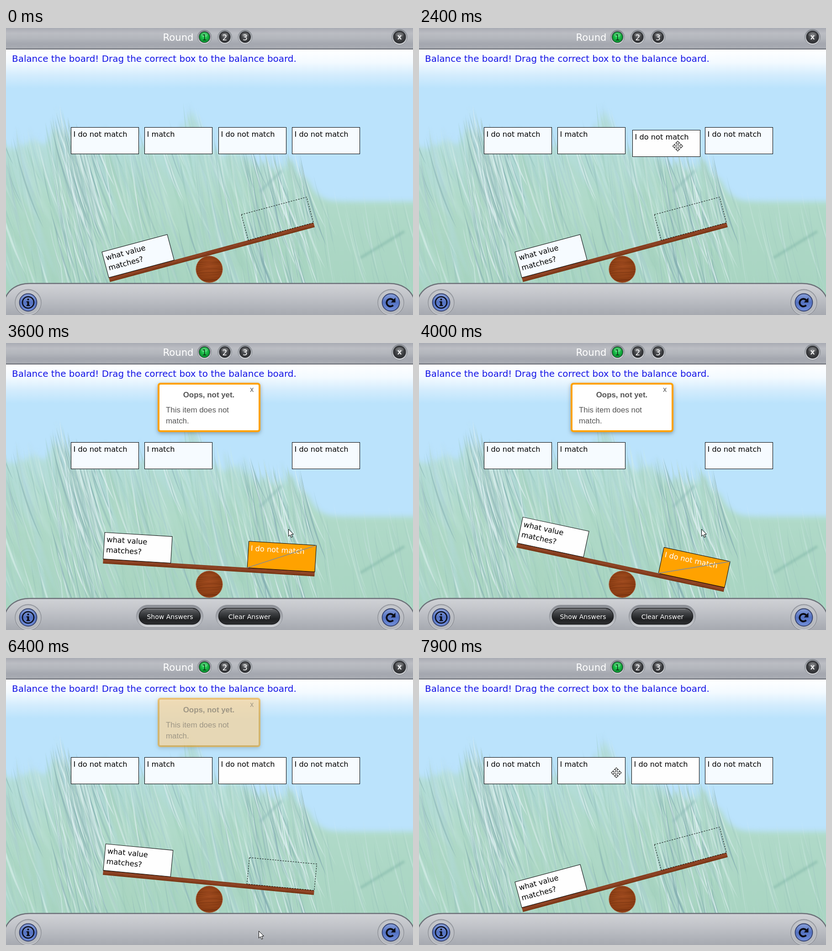
These frames come from a looping animation (891x628 px, 8000 ms). An HTML page with a canvas:

```html
<!DOCTYPE html>
<html lang="en">
<head>
<meta charset="utf-8">
<title>Balance the board</title>
<style>
html, body { margin: 0; width: 100%; height: 100%; overflow: hidden; }
canvas { display: block; }
</style>
</head>
<body>
<canvas id="stage" width="891" height="628"></canvas>
<script>
const W = 891, H = 628, LOOP = 8000;
const SANS = '"DejaVu Sans", sans-serif';
const ARIAL = '"Liberation Sans", sans-serif';
const PIVOT = { x: 445.25, y: 471.6 };
const BOX_W = 148, BOX_H = 58, BOX_Y = 217.5;
const PALE = '#f6fbff', WHITE = '#fefefe', ORANGE = '#ffa200';
const GRAB = 2300, DROP = 3200, PRESS = 6100, CLEAR = 6300;
const slotX = i => Math.floor(142 + 161.5 * i) + 0.5;

const stage = document.getElementById('stage').getContext('2d');
let c = stage;

function makeRandom(seed) {
  return () => (seed = (seed * 16807) % 2147483647) / 2147483647;
}

function addStops(gradient, colors) {
  colors.forEach((color, i) => gradient.addColorStop(i / (colors.length - 1), color));
  return gradient;
}

const vertical = (y0, y1, ...colors) => addStops(c.createLinearGradient(0, y0, 0, y1), colors);
const radial = (x, y, r, ...colors) =>
  addStops(c.createRadialGradient(x, y - r * 0.35, 0, x, y, r), colors);

function paint(fill, stroke, width = 1) {
  if (fill) { c.fillStyle = fill; c.fill(); }
  if (stroke) { c.strokeStyle = stroke; c.lineWidth = width; c.stroke(); }
}

function rect(x, y, w, h, fill) {
  c.fillStyle = fill;
  c.fillRect(x, y, w, h);
}

function disc(x, y, r, fill, stroke, width) {
  c.beginPath();
  c.arc(x, y, r, 0, Math.PI * 2);
  paint(fill, stroke, width);
}

function pill(x, y, w, h, r, fill, stroke, width) {
  c.beginPath();
  c.roundRect(x, y, w, h, r);
  paint(fill, stroke, width);
}

function line(x0, y0, x1, y1, color, width) {
  c.beginPath();
  c.moveTo(x0, y0);
  c.lineTo(x1, y1);
  paint(null, color, width);
}

function poly(points, fill, stroke, width) {
  c.beginPath();
  points.forEach(([x, y]) => c.lineTo(x, y));
  c.closePath();
  paint(fill, stroke, width);
}

function text(str, x, y, size, color, { font = SANS, weight = '', align = 'left' } = {}) {
  c.font = `${weight} ${size}px ${font}`;
  c.textAlign = align;
  c.fillStyle = color;
  c.fillText(str, x, y);
}

// ---- Field of grain ----

const bump = (x, center, width) => Math.exp(-(((x - center) / width) ** 2));

// Height of the grain tops: high on the left, falling to a flat horizon on the right.
function ridge(x) {
  const fall = 1 / (1 + Math.exp((655 - x) / 14));
  const left = 235 + 45 * bump(x, 580, 90) - 45 * bump(x, 112, 22) - 65 * bump(x, 405, 30);
  return left + (372 - left) * fall;
}

function blades(random, { count, from, to, width, alpha, tones }) {
  for (let i = 0; i < count; i++) {
    const x = from + random() * (to - from);
    const depth = random();
    const top = ridge(x) - 30 + 330 * depth * depth + random() * 25;
    const len = 70 + random() * 150;
    const lean = len * (0.1 + random() * 0.28);
    const w = width * (0.4 + random());
    c.beginPath();
    c.moveTo(x, top);
    c.quadraticCurveTo(x + lean * 0.35 + w, top + len * 0.5, x + lean + w, top + len);
    c.quadraticCurveTo(x + lean * 0.35 - w, top + len * 0.6, x, top);
    paint(`rgba(${tones[i % tones.length]},${alpha * (0.5 + random())})`);
  }
}

function drawField() {
  rect(0, 0, W, H, vertical(47, 132, '#ffffff', '#f3faff', '#d3ecfd', '#bbe3fc'));
  const random = makeRandom(4711);
  const crest = [];
  for (let x = -20; x <= W + 20; x += 10) crest.push([x, ridge(x) + 8 + 26 * random() * (x < 660)]);
  crest.push([W + 20, H], [-20, H]);
  c.save();
  c.filter = 'blur(6px)';
  poly(crest, vertical(190, 560, '#b8e0e6', '#b4ddd8', '#b0dac9', '#acd7c5', '#a9d5c2'));
  c.filter = 'blur(3px)';
  blades(random, { count: 170, from: -40, to: 640, width: 9, alpha: 0.24,
    tones: ['158,205,184', '196,229,222', '172,214,190', '184,220,232'] });
  c.filter = 'none';
  blades(random, { count: 330, from: -40, to: 645, width: 2.6, alpha: 0.24,
    tones: ['150,199,182', '205,234,226', '168,212,190', '160,196,206'] });
  const bristle = { width: 0.8, alpha: 0.55, tones: ['222,240,242', '136,178,180', '176,212,204'] };
  blades(random, { ...bristle, count: 190, from: 95, to: 190 });
  blades(random, { ...bristle, count: 150, from: 515, to: 650 });
  blades(random, { ...bristle, count: 120, from: -30, to: 520, alpha: 0.4 });
  blades(random, { ...bristle, count: 70, from: 660, to: W, alpha: 0.2 });
  c.filter = 'blur(2px)';
  line(776, 503, 872, 445, 'rgba(122,178,164,.45)', 6);
  line(556, 358, 604, 312, 'rgba(130,180,178,.4)', 6);
  c.restore();
}

// ---- Fixed controls ----

function roundButton(x, y, r, colors) {
  disc(x, y, r + 4, vertical(y - r - 4, y + r + 4, '#868a91', '#d7d9dd'), '#7c8087', 0.8);
  disc(x, y, r + 1, '#303236');
  disc(x, y, r, radial(x, y, r, ...colors));
  c.beginPath();
  c.ellipse(x, y - r * 0.45, r * 0.7, r * 0.42, 0, 0, Math.PI * 2);
  paint('rgba(255,255,255,.18)');
}

function drawHeader() {
  rect(0, 0, W, 46, vertical(0, 46, '#a9acb4', '#bbbdc3', '#b3b6bc', '#a4a7af', '#a9acb3'));
  rect(0, 45, W, 2, '#666a72');
  text('Round', 343.5, 28, 21.2, '#fff');
  const dark = ['#77797d', '#4b4d50', '#2d2e31'];
  const green = ['#4cf07a', '#1fc24c', '#078a2c'];
  for (let i = 0; i < 3; i++) {
    const x = 434.5 + i * 44.5;
    roundButton(x, 20, 11.5, i ? dark : green);
    text(i + 1, x, 26.5, 17, i ? '#fff' : '#062d10', { align: 'center' });
  }
  roundButton(861.5, 20, 13, dark);
  text('X', 861.5, 24.5, 12.5, '#fff', { align: 'center', weight: 'bold' });
  text('Balance the board! Drag the correct box to the balance board.', 13, 74, 19.93, '#1414e6');
}

function blueButton(x, y) {
  disc(x, y, 28.5, vertical(y - 29, y + 29, '#a6a9b0', '#d0d2d6'), '#85888f', 1.2);
  disc(x, y, 26.5, vertical(y - 27, y + 27, '#c6c8cd', '#b0b3b9'));
  disc(x, y, 19, vertical(y - 20, y + 20, '#8ca3dc', '#5472c2', '#7390dc'), '#34406b', 1.8);
}

function drawFooter() {
  const curve = 52;
  c.beginPath();
  c.moveTo(-2, 592);
  c.bezierCurveTo(6, 572, 24, 559, curve, 559);
  c.lineTo(W - curve, 559);
  c.bezierCurveTo(W - 24, 559, W - 6, 572, W + 2, 592);
  c.lineTo(W + 2, H + 5);
  c.lineTo(-2, H + 5);
  c.closePath();
  paint(vertical(559, 628, '#d0d2d6', '#c4c6cb', '#b5b8be', '#a6a9b0'), '#6d7179', 2.4);

  const ink = '#0b0d18', y = 600.5;
  blueButton(48.5, y);
  disc(48.5, y, 12.5, null, ink, 2.6);
  disc(48.5, y - 6.5, 2.1, ink);
  rect(46.5, y - 2.5, 4, 10, ink);
  rect(44.8, y - 2.5, 4, 2.2, ink);
  rect(44.8, y + 5.5, 7.6, 2.4, ink);

  blueButton(842.5, y);
  c.beginPath();
  c.arc(841.5, y + 0.5, 8.3, 0.75, Math.PI * 1.78);
  paint(null, ink, 4);
  poly([[852.5, y - 10.5], [852.5, y], [842.5, y]], ink);
}

function footerButton(x, label, pressed) {
  pill(x, 573.5, 146, 49, 24.5, vertical(573, 623, '#8a8d94', '#a6a9af', '#d2d4d8'), '#8d9097', 1);
  const shades = pressed ? ['#2a2b2d', '#1b1c1e', '#3a3b3e'] : ['#6b6c70', '#3e4043', '#202123', '#2e2f32'];
  pill(x + 6, 580.5, 134, 35, 17.5, vertical(580, 616, ...shades), '#17181a', 1.4);
  line(x + 22, 582.2, x + 124, 582.2, 'rgba(255,255,255,.35)', 1);
  text(label, x + 73.5, 604, 14, '#fff', { align: 'center' });
}

function drawWheel() {
  const x = 445, y = 528, r = 29.3;
  disc(x, y, r, radial(x, y, 34, '#a24c20', '#964519', '#873a12'));
  c.save();
  c.clip();
  for (let i = 0; i < 15; i++) {
    const gy = y - r + i * 4;
    c.beginPath();
    c.moveTo(x - r, gy + 3);
    c.bezierCurveTo(x - 12, gy - 4 * Math.sin(i), x + 8, gy + 5 * Math.cos(i * 2), x + r, gy - 2);
    paint(null, `rgba(84,30,6,${0.25 + 0.15 * Math.sin(i * 5)})`, 1.2);
  }
  c.restore();
  disc(x, y, r, null, '#b98263', 0.9);
}

// ---- Moving parts ----

function card(x, y, lines, fill, ink = '#000') {
  rect(x, y, BOX_W, BOX_H, fill);
  c.strokeStyle = '#000';
  c.lineWidth = 1;
  c.strokeRect(x, y, BOX_W, BOX_H);
  lines.forEach((str, i) => text(str, x + 5, y + 20.5 + i * 22.6, 16.2, ink));
}

function drawBoard(angle, placed, fill) {
  const half = 232, top = 15, right = half - BOX_W, boxTop = top - BOX_H;
  c.save();
  c.translate(PIVOT.x, PIVOT.y);
  c.rotate(angle * Math.PI / 180);
  rect(-half, top, half * 2, 10, vertical(top, top + 10, '#7f3a18', '#94482a', '#8a4020', '#74330f'));
  for (let i = 0; i < 24; i++) {
    rect(-half + (i * 97) % 430, top + 2 + (i * 5) % 7, 32, 0.9, 'rgba(80,30,8,.3)');
  }
  card(-half, boxTop, ['what value', 'matches?'], fill);
  if (placed) {
    card(right, boxTop, ['I do not match'], ORANGE, '#fff');
    line(right, top, half, boxTop, '#8c8c8c', 1.6);
  } else {
    c.setLineDash([3, 2.6]);
    c.strokeStyle = '#000';
    c.lineWidth = 1;
    c.strokeRect(right, boxTop, BOX_W, BOX_H);
  }
  c.restore();
}

function drawPopup(alpha) {
  if (alpha <= 0) return;
  const grey = '#555', x = 332, y = 87;
  c.save();
  c.globalAlpha = alpha;
  c.shadowColor = 'rgba(0,0,0,.3)';
  c.shadowBlur = 9;
  c.shadowOffsetY = 3;
  pill(x, y, 225, 108, 6, ORANGE);
  c.shadowColor = 'transparent';
  pill(x + 4, y + 4, 217, 100, 2.5, '#fff');
  text('Oops, not yet.', x + 112, y + 32, 16.9, grey, { font: ARIAL, weight: 'bold', align: 'center' });
  text('This item does not', x + 18, y + 65, 16.9, grey, { font: ARIAL });
  text('match.', x + 18, y + 88.5, 16.9, grey, { font: ARIAL });
  text('x', x + 206.3, y + 20, 16, grey, { font: ARIAL, align: 'center' });
  c.restore();
}

const cursors = {
  arrow() {
    poly([[0.5, 0.5], [0.5, 16], [4, 12.7], [6.5, 18.4], [9, 17.3], [6.6, 11.8], [11.4, 11.4]],
      '#fff', '#000', 1);
  },
  move() {
    const arm = [[-1.5, -1.5], [-1.5, -6.5], [-4.5, -6.5], [0, -11], [4.5, -6.5], [1.5, -6.5]];
    const turned = turn => arm.map(([x, y]) => [[x, y], [-y, x], [-x, -y], [y, -x]][turn]);
    poly([0, 1, 2, 3].flatMap(turned), '#fff', '#222', 1.1);
  },
  hand() {
    c.translate(3, 0);
    pill(-1.5, 0.5, 3, 12, 1.5, '#fff', '#000', 1);
    pill(-5, 9, 5, 6, 2, '#fff', '#000', 1);
    pill(-1.5, 7, 10.5, 13, 3, '#fff', '#000', 1);
    rect(-3, 10, 4, 4, '#fff');
    rect(-1, 5, 2, 8, '#fff');
    for (let x = 1.5; x < 7; x += 2.5) line(x, 7, x, 11, '#000', 0.8);
  }
};

// Each move glides to its end point and rests there until the next one begins.
const moves = [
  { start: 500, end: 1300, x: 619, y: 485 },
  { start: 1400, end: 1900, x: 560, y: 243 },
  { start: GRAB, end: 3000, x: 615, y: 376 },
  { start: 3000, end: DROP, x: 618, y: 407 },
  { start: 4100, end: 4900, x: 624, y: 483 },
  { start: 4900, end: 5400, x: 553, y: 597 },
  { start: 7000, end: 7900, x: 432, y: 251 }
];

const clamp = k => Math.min(1, Math.max(0, k));
const glide = k => k * (0.7 + k * (0.9 - 0.6 * k));
const easeOut = k => 1 - (1 - clamp(k)) ** 3;

function pointerAt(t) {
  let x = 855, y = 614;
  for (const move of moves) {
    const k = glide(clamp((t - move.start) / (move.end - move.start)));
    x += (move.x - x) * k;
    y += (move.y - y) * k;
  }
  return [x, y];
}

function tilt(t) {
  return -15 + 30 * (easeOut((t - DROP + 10) / 1500) - easeOut((t - CLEAR + 80) / 1500));
}

function layer(...painters) {
  const canvas = document.createElement('canvas');
  canvas.width = W;
  canvas.height = H;
  c = canvas.getContext('2d');
  painters.forEach(painter => painter());
  c = stage;
  return canvas;
}

const scenery = layer(drawField, drawHeader, drawWheel);
const footer = layer(drawFooter);

function draw(t) {
  const placed = t >= DROP && t < CLEAR;
  const dragging = t > GRAB && t < DROP;
  const [px, py] = pointerAt(t);

  c.drawImage(scenery, 0, 0);
  drawBoard(tilt(t), placed, t < DROP ? PALE : WHITE);
  c.drawImage(footer, 0, 0);

  for (let i = 0; i < 4; i++) {
    if (i === 2 && (placed || dragging)) continue;
    card(slotX(i), BOX_Y, [i === 1 ? 'I match' : 'I do not match'], i === 2 && t >= CLEAR ? WHITE : PALE);
  }
  if (dragging) card(Math.round(px - 99) + 0.5, Math.round(py - 36) + 0.5, ['I do not match'], WHITE);

  if (placed) {
    footerButton(285.5, 'Show Answers', false);
    footerButton(459.5, 'Clear Answer', t >= PRESS);
  }
  drawPopup(Math.min((t - DROP + 100) / 400, (CLEAR + 300 - t) / 400, 1));

  if (t >= 500) {
    const overCard = py > BOX_Y && py < BOX_Y + BOX_H;
    const overButton = placed && py > 580;
    c.save();
    c.translate(px, py);
    cursors[dragging || overCard ? 'move' : overButton ? 'hand' : 'arrow']();
    c.restore();
  }
}

// The picture advances in steps of a tenth of a second.
function tick() {
  draw(Math.floor((performance.now() % LOOP) / 100) * 100);
  requestAnimationFrame(tick);
}
tick();
</script>
</body>
</html>
```
